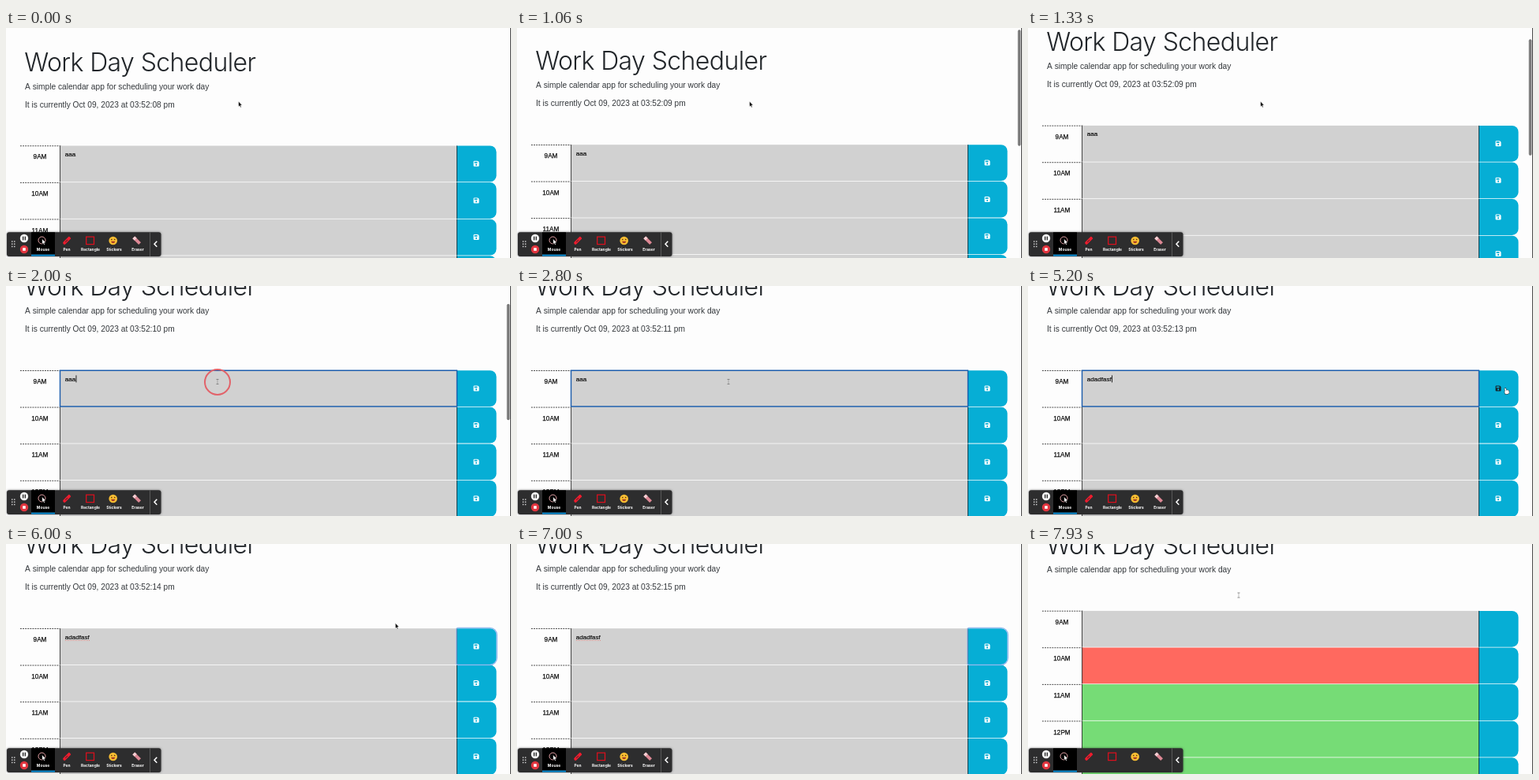
An HTML page with a canvas for the animation above (8000 ms loop, 640x292 px).

```html
<!DOCTYPE html>
<html lang="en">
<head>
<meta charset="utf-8">
<title>Work Day Scheduler</title>
<style>
html, body { margin: 0; width: 100%; height: 100%; overflow: hidden; background: #fdfdfd; }
canvas { display: block; width: 640px; height: 292px; }
</style>
</head>
<body>
<canvas id="stage" width="640" height="292"></canvas>
<script>
const ctx = document.getElementById('stage').getContext('2d');
const LOOP = 8000, ROW = 46.6;
const SANS = '"Liberation Sans", Arial, sans-serif';
const HOURS = ['9AM', '10AM', '11AM', '12PM', '1PM'];
const TOOLS = ['Mouse', 'Pen', 'Rectangle', 'Stickers', 'Eraser'];
const SCROLL = 1000, FOCUS = 1980, ERASE = 3000, TYPE = 3600, SAVE = 5530, RELOAD = 7800;

const clamp = v => Math.max(0, Math.min(1, v));
const ramp = (t, a, b) => clamp((t - a) / (b - a));
const smooth = u => u * u * (3 - 2 * u);
const mix = (a, b, u) => a.map((v, i) => v + (b[i] - v) * u);

// The pointer rests on the title area, the first entry, its button, then leaves at the top.
function pointerAt(t) {
  if (t >= RELOAD) return [267, 65];
  const field = mix([294.5, 93], [268, 121.5], smooth(ramp(t, 1500, 1800)));
  const button = mix(field, [604, 130], smooth(ramp(t, 4600, 5130)));
  return mix(button, [105, -4], smooth(ramp(t, 5800, 6460)));
}

// Backspace away the old entry, then type the new one at a steady pace.
function typedAt(t) {
  if (t < TYPE) return 'aaa'.slice(Math.max(0, Math.floor((t - ERASE) / 165) + 1));
  return 'adadfasf'.slice(0, Math.floor((t - TYPE) / 140) + 1);
}

function rect(x, y, w, h, color) {
  ctx.fillStyle = color;
  ctx.fillRect(x, y, w, h);
}

function frame(x, y, w, h, r, color, width) {
  ctx.beginPath();
  ctx.roundRect(x, y, w, h, r);
  ctx.strokeStyle = color;
  ctx.lineWidth = width;
  ctx.stroke();
}

function rounded(x, y, w, h, r, color) {
  ctx.beginPath();
  ctx.roundRect(x, y, w, h, r);
  ctx.fillStyle = color;
  ctx.fill();
}

function disc(x, y, r, color) {
  ctx.beginPath();
  ctx.arc(x, y, r, 0, Math.PI * 2);
  ctx.fillStyle = color;
  ctx.fill();
}

function circle(x, y, r, color, width) {
  ctx.beginPath();
  ctx.arc(x, y, r, 0, Math.PI * 2);
  ctx.strokeStyle = color;
  ctx.lineWidth = width;
  ctx.stroke();
}

function at(x, y, angle, paint) {
  ctx.save();
  ctx.translate(x, y);
  ctx.rotate(angle);
  paint();
  ctx.restore();
}

function text(str, x, y, font, color, align = 'left', weight = 0) {
  ctx.font = font;
  ctx.textAlign = align;
  ctx.fillStyle = ctx.strokeStyle = color;
  ctx.fillText(str, x, y);
  if (weight) { ctx.lineWidth = weight; ctx.strokeText(str, x, y); }
}

function header(t, scroll) {
  const small = '10.2px ' + SANS;
  ctx.letterSpacing = '-0.6px';
  text('Work Day Scheduler', 23.2, 54.5 - scroll, '300 32px Inter, ' + SANS, '#212529');
  ctx.letterSpacing = '0px';
  text('A simple calendar app for scheduling your work day', 24, 77.6 - scroll, small, '#33373b');
  if (t >= RELOAD) return;
  const sec = String(8 + Math.floor((t + 200) / 1000)).padStart(2, '0');
  text(`It is currently Oct 09, 2023 at 03:52:${sec} pm`, 24, 100.6 - scroll, small, '#33373b');
}

function saveIcon(x, y, color) {
  rounded(x - 3.5, y - 3.5, 7, 7, [1, 2.5, 1, 1], color);
  rect(x - 2.4, y - 2.5, 3.8, 1.8, '#06aed5');
  disc(x, y + 1.4, 1.1, '#06aed5');
}

function row(i, y, t, hover) {
  const fresh = t >= RELOAD, h = ROW - .8;
  const color = !fresh || i === 0 ? '#d1d1d1' : i === 1 ? '#ff695f' : '#76dc76';
  for (let x = 18; x < 68; x += 3.1) rect(x, y - .2, 1.9, .9, '#333');
  text(HOURS[i], 43, y + 16.9, '8.2px ' + SANS, '#111', 'center', .25);
  rect(68, y, 503.5, h, color);
  rect(68.1, y, .9, h, '#333');
  rounded(571, y, 50.5, h, [0, 8, 8, 0], '#06aed5');
  rect(571, y, .9, h, '#0b3440');
  if (!fresh) saveIcon(596, y + 22.8, hover ? '#16242b' : '#fff');
}

function entry(y, t) {
  const value = typedAt(t);
  text(value, 74.7, y + 13.5, '8.1px ' + SANS, '#111', 'left', .2);
  const end = 75 + ctx.measureText(value).width;
  if (t >= SAVE) {
    for (let x = 75; x < end; x += 2) rect(x, y + 15, 1, .8, 'rgba(225,70,60,.6)');
    frame(571, y - .7, 51.2, ROW + .4, [2, 9, 9, 2], 'rgba(130,175,235,.8)', 1.5);
  } else if (t >= FOCUS) {
    frame(68.5, y, 503, ROW - .8, 0, '#1b5cab', 1.4);
    const typing = t > ERASE && t < TYPE + 1000;
    if (typing || (t - FOCUS) % 1040 < 530) rect(end, y + 6.2, .9, 9, '#111');
  }
}

function arrow(x, y, fill, edge) {
  at(x, y, 0, () => {
    const path = new Path2D('M0 0V7L1.5 5.7L2.6 8L3.8 7.5L2.8 5.2L4.8 5Z');
    ctx.fillStyle = fill;
    ctx.fill(path);
    ctx.strokeStyle = edge;
    ctx.lineWidth = .6;
    ctx.stroke(path);
  });
}

function toolbar(labels) {
  ctx.shadowColor = 'rgba(0,0,0,.5)';
  ctx.shadowBlur = 3;
  rounded(1, 259.3, 195.5, 30.7, 3, '#2d2d2e');
  ctx.shadowBlur = 0;
  rect(32, 259.3, 30, 30.7, '#000');
  rect(32, 287.6, 30, 2, '#1298e0');
  for (let i = 0; i < 6; i++) rect(7 + i % 2 * 3, 270.3 + (i >> 1) * 3.2, 1.5, 1.5, '#ccc');

  disc(23, 267, 5.2, '#f4f4f4');
  for (const x of [21, 23.7]) rect(x, 264.7, 1.3, 4.6, '#222');
  disc(23, 281, 5.2, '#e2353f');
  rect(21.2, 279.2, 3.6, 3.6, '#fff');

  circle(45.5, 269.5, 4.5, '#e9a6aa', 1);
  arrow(45.7, 267.6, '#fff', '#000');
  at(77, 270, -Math.PI / 4, () => {
    rounded(-6, -1.9, 12, 3.8, [2, 1, 1, 2], '#ed1c2e');
    rect(-2.5, -.4, 4, .8, '#2d2d2e');
  });
  frame(101.7, 265.2, 9.8, 9.4, 0, '#d9101e', 1.3);
  disc(135.7, 270, 5.3, '#f8bd32');
  for (const x of [133.8, 137.7]) disc(x, 268.5, .8, '#4d2c12');
  rounded(133.2, 270.8, 5, 2.4, [0, 0, 2.4, 2.4], '#a63b25');
  at(165.7, 269.7, Math.PI / 4, () => {
    rect(-5.5, -2, 11, 4, '#dc8794');
    rect(-5.5, -2, 3.5, 4, '#f3cfd3');
  });

  if (labels) TOOLS.forEach((s, i) => text(s, 47 + i * 30, 282.6, '700 4.9px Inter, sans-serif', '#fff', 'center'));
  rect(182, 259.3, .8, 30.7, '#666');
  ctx.strokeStyle = '#fff';
  ctx.lineWidth = 1.5;
  ctx.stroke(new Path2D('M191.3 270.7l-3.3 3.5l3.3 3.5'));
}

function beam(x, y) {
  for (const side of [-1, 1]) rect(x - 1.5, y + side * 3 - .4, 3, .8, '#777');
  rect(x - .35, y - 3, .7, 6, 'rgba(90,90,90,.5)');
}

function hand(x, y) {
  at(x, y, -.2, () => {
    frame(0, 0, 1.6, 5, .8, '#222', 1);
    frame(-.8, 3, 5.4, 4.6, 1.6, '#222', 1);
    rounded(0, 0, 1.6, 5, .8, '#fff');
    rounded(-.8, 3, 5.4, 4.6, 1.6, '#fff');
  });
}

function ring(x, y, t, start) {
  if (t < start) return;
  ctx.globalAlpha = 1 - ramp(t, start + 130, start + 450);
  circle(x, y, 16, '#e2636a', 2);
  ctx.globalAlpha = 1;
}

function draw(t) {
  const fresh = t >= RELOAD;
  const scroll = fresh ? 41.6 : 42.3 * smooth(ramp(t, SCROLL, SCROLL + 580));
  const top = 149.5 - scroll - (fresh ? 23 : 0);
  const [px, py] = pointerAt(t);
  const inRow = py > top && py < top + ROW;
  const hover = inRow && px > 571;

  rect(0, 0, 640, 292, '#fdfdfd');
  header(t, scroll);
  HOURS.forEach((_, i) => row(i, top + i * ROW, t, i === 0 && hover));
  if (!fresh) entry(top, t);

  const bar = ramp(t, SCROLL - 40, SCROLL + 30) * (1 - ramp(t, 2130, 2500));
  rounded(634.7, 1.5 + scroll * .5, 3.8, 147.5, 2, `rgba(110,110,110,${bar * .9})`);
  rect(639, 0, 1, 292, '#4a4a4a');

  toolbar(!fresh);
  ring(268, 122, t, FOCUS);
  ring(605, 132, t, SAVE);
  if (hover) hand(px, py);
  else if (fresh || (inRow && px > 68)) beam(px, py);
  else arrow(px, py, '#111', '#fff');
}

function tick() {
  draw(performance.now() % LOOP);
  requestAnimationFrame(tick);
}
tick();
</script>
</body>
</html>
```
